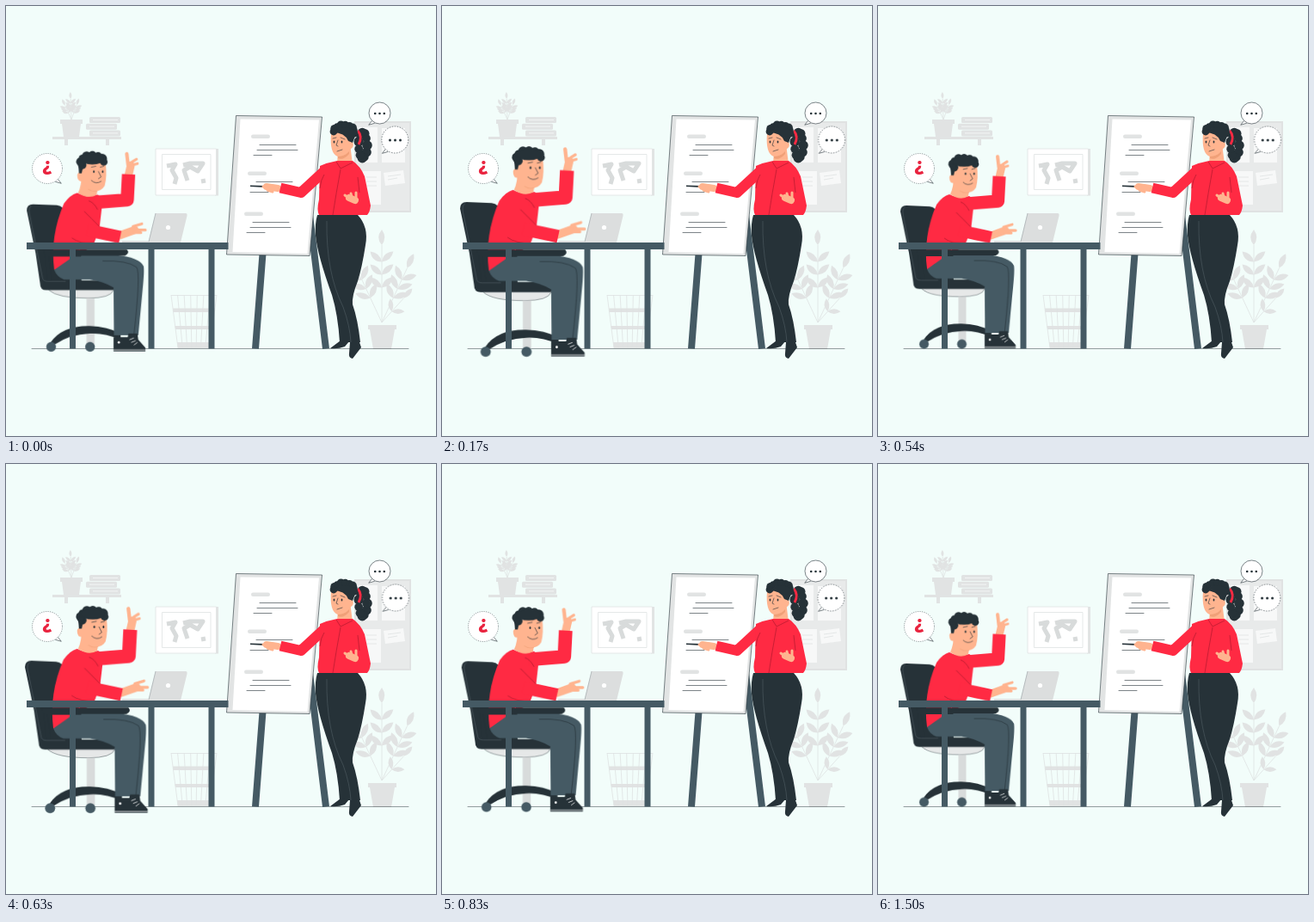
These frames come from a looping animation (500x500 px, 1.54 s). An HTML page:

```html
<!DOCTYPE html>
<html lang="en">
<head>
<meta charset="utf-8">
<title>Lesson at the flip chart</title>
<style>
  html, body { margin: 0; width: 100%; height: 100%; overflow: hidden; background: #f2fdfa; }
  svg { display: block; width: 100vw; height: 100vh; }
  .dark { fill: #263238; }
  .slate { fill: #455a64; }
  .red { fill: #ff2a43; }
  .skin { fill: #ffb48f; }
  .grey { fill: #e1e3e3; }
  .white { fill: #fff; }
  .limb { fill: none; stroke-linejoin: round; }
  .limb.dark { stroke: #263238; }
  .limb.slate { stroke: #455a64; }
  .limb.red { stroke: #ff2a43; }
  .limb.skin { stroke: #ffb48f; stroke-linecap: round; }
  .limb.grey { stroke: #d8dbdb; }
  .ink { fill: none; stroke: #263238; stroke-width: .6; stroke-linecap: round; }
  .fold { fill: none; stroke: #a3172b; stroke-width: .6; }
  .seam { fill: none; stroke: #58666c; stroke-width: .5; }
  .pale { fill: none; stroke: #dfe2e2; stroke-width: .8; }
  .edge { fill: #fff; stroke: #263238; stroke-width: .6; }
  #man { transform-origin: 88px 282px; animation: beat 1540ms -40ms linear infinite; }
  #talk { animation: sway 385ms ease-in-out infinite; }
  @keyframes beat {
    0%, 37.7% { transform: scale(1); }
    9.1%, 46.8% { transform: scale(1.1); animation-timing-function: cubic-bezier(.3, .25, .6, 1); }
    35.1%, 72.7%, 100% { transform: scale(1); }
  }
  @keyframes sway { 50% { transform: translateX(.8px); } }
</style>
</head>
<body>
<svg viewBox="0 0 500 500">
  <!-- shelf -->
  <g id="sprig"></g>
  <path class="grey" d="M54 152H134V155H54zM68 155h4v7h-4zM116 155h4v7h-4zM63 132H89V137H63zM65 137H87L85 152H67z"/>
  <g id="books"></g>

  <!-- map -->
  <path class="grey" d="M243 166H247V220.500H243z"/>
  <path class="pale white" style="fill:#fff" d="M174 166H244.500V220H174z"/>
  <path class="pale" d="M181.500 172.500H238V213.500H181.500z"/>
  <path class="limb grey" stroke-width="5" d="M187 186l10-2-4 7 5 9-2 7M206 185l8-2 15 0-6 9-9-5-7 4 4 12M227 204l5-1"/>

  <!-- pin board -->
  <path fill="#e0e2e2" d="M405 134H471V240H405z"/>
  <path fill="#e8eaea" d="M407 136H469V238H407z"/>
  <path fill="#f7f8f8" d="M410 141h22v41h-22zM437 142h27v40h-27zM415 192h21v39h-21zM439 194l23-3 2 15-23 3z"/>
  <path class="pale" d="M419 199h12m-12 5h12m-12 5h12m13-11l15-2m-15 6l11-2"/>

  <!-- potted plant and bin -->
  <g id="plant"></g>
  <path class="grey" d="M421 371H454V376H421zM423 376H452L448 399H427z"/>
  <path class="grey" d="M194 351.500H243L242.500 356H194.500zM196.500 372H240.500L240 376H197zM199 391H238L237 398H200z"/>
  <g id="bin"></g>
  <path class="ink" d="M30 398.500H468" opacity=".8"/>

  <!-- flip chart -->
  <path class="limb slate" stroke-width="8" d="M298.500 288L290 398.500M352 235L372 398.500"/>
  <path d="M267.500 127.500L367.500 129L353 290.500L256.500 289z" fill="#e2e4e4" stroke="#263238" stroke-width=".6"/>
  <path class="white" d="M272.500 131.500L364 132.500L350.500 288L263.500 286z"/>
  <g id="notes"></g>

  <!-- teacher -->
  <g id="tail" class="dark"></g>
  <path class="limb red" stroke-width="2.800" d="M409 145Q415 152 410 161"/>
  <path class="skin" d="M386 168L400 160L403 184L385 184z"/>
  <path d="M386 173Q393 176 399 169V172Q392 180 386 177z" fill="#f0a078"/>
  <path class="skin" d="M378 148Q388 141 396 150L403 158Q406 163 400 167Q394 175 386 175Q376 172 378 148z"/>
  <g id="crown" class="dark"></g>
  <path class="dark" d="M380 147Q393 136 408 146L403 159L398 157Q394 147 380 147z"/>
  <path class="ink" d="M380 154l4-1M389 153l5 2M386 156l-2 6 2 1M385 169l6-2"/>
  <g id="look" class="dark"></g>
  <path class="dark" d="M284 208.500L302 209V211L284 210z"/>
  <path class="limb skin" stroke-width="8" d="M303 210L316 212"/>
  <path class="limb skin" stroke-width="3" d="M299 210h6M304 214l6 2"/>
  <path class="dark" d="M362 243H409Q422 257 418 278Q414 304 409 320Q402 337 403 347Q409 364 412 391H388Q386 359 379 336Q362 289 360 267Q359 253 362 243z"/>
  <path class="seam" d="M373 250Q372 310 392 350Q400 372 401 391"/>
  <path class="dark" d="M389 389l10 1-5 6Q386 399 377 398zM400 391h11l2 6-10 13Q398 409 399 404z"/>
  <path class="limb red" stroke-width="12" d="M319 211.500L343 217L369 193"/>
  <path class="red" d="M385 180H403Q412 186 417 198L424 232Q423 240 420 243H364Q361 237 364 225L365 186Q374 182 385 180z"/>
  <path class="fold" d="M384 181l5 8 14-7M389 190Q384 217 380 243M365 212Q366 202 370 196M409 199l2 18"/>
  <path class="limb skin" stroke-width="8" d="M399 223L406 226"/>
  <path class="limb skin" stroke-width="3" d="M394 220l4 3M401 218l1 4M407 217l0 6"/>

  <!-- pupil on his chair -->
  <g id="man">
    <path class="dark" d="M26 239Q26 232 33 232L60 233Q68 234 70 243L88 318H120Q126 320 124 329H48Q41 329 41 321L36 287z"/>
    <path class="seam" d="M31 234Q28 236 29 242L44 316Q45 319 50 319H70"/>
    <path d="M51 329H124Q121 338 95 338Q61 338 51 329z" fill="#e6e8e8" stroke="#263238" stroke-width=".4"/>
    <path class="limb grey" stroke-width="9" d="M98 338V390"/>
    <path class="dark" d="M53 388Q66 369 97 369.500Q117 370 132 378V385Q114 377 97 378Q75 379 58 390z"/>
    <circle class="slate" cx="53.500" cy="393" r="5.500"/>
    <circle class="slate" cx="97.500" cy="393" r="5.500"/>

    <path class="limb skin" stroke-width="9" d="M131 267L148 261"/>
    <path class="limb skin" stroke-width="3" d="M146 257l10-3M149 261l11 0M147 264l8 0"/>
    <path class="limb skin" stroke-width="9" d="M141 199L143.500 188"/>
    <path class="limb skin" stroke-width="4" d="M140.500 188L139 175"/>
    <path class="limb skin" stroke-width="3" d="M145 184l5-3M147 187l4-1"/>
    <path class="red" d="M83 219Q94 225 106 221L112 225L108 260L102 276L80 295L57 306Q52 268 68 231Q75 221 83 219z"/>
    <path class="limb red" stroke-width="14" d="M94 261L131.500 269"/>
    <path class="limb red" stroke-width="15" d="M100 230L139.500 227L141 198"/>
    <path class="fold" d="M106 238Q102 230 96 228M108 257Q99 248 91 240M103 276Q86 277 77 270"/>
    <path class="slate" d="M57 306Q70 297 84 287L126 289Q154 292 158 302Q159 307 157 327L152 380H124.500L124 326Q112 319 97 317H68Q60 314 57 306z"/>
    <path class="ink" d="M112 296Q139 295 150 303Q155 309 147 380"/>
    <path class="dark" d="M124 382H140L141 378H151L152 385L160 394V398H124z"/>
    <path class="limb" stroke="#fff" stroke-width=".7" d="M124 396.500H160M142 385l5-2m-3 5l5-2m-2 5l4-3"/>
    <circle class="white" cx="130" cy="388" r="1.300"/>

    <path class="skin" d="M88 196L107 208L105 221Q96 227 84 219Q88 211 88 196z"/>
    <path d="M95 215Q101 219 106 217V212z" fill="#f0a078"/>
    <path class="skin" d="M88 191Q98 180 115 185Q117 200 114 211Q110 218 100 217Q92 214 89 206Q83 207 83 199Q84 195 88 196z"/>
    <g id="hair" class="dark"></g>
    <path class="dark" d="M84 184H91L88 197H85z"/>
    <path class="ink" d="M99 190l5-1M109 190l4-1M107 195l3 6-3 2M99 205Q104 210 110 206"/>
    <g id="gaze" class="dark"></g>
    <path class="dark" d="M44 283H84Q93 284 87 291H49Q45 290 44 283zM86 283H139Q143 287 137 290H84zM46 289h4l4 29h-5z"/>
  </g>

  <!-- laptop and desk -->
  <path fill="#dcdede" d="M174 241H209Q211 241 210.500 244L203 275H135V273H166z"/>
  <path class="limb" stroke="#b4babc" d="M174 241L166 274"/>
  <circle class="white" cx="188.500" cy="257.500" r="2.600"/>
  <path class="limb slate" stroke-width="7" d="M77.500 280V398.500M169 280V398.500M239 280V398.500"/>
  <path class="slate" d="M24 275H258.500V283H24z"/>

  <!-- speech bubbles -->
  <g id="ask"></g>
  <text x="47.800" y="192" fill="#e9233f" font-family="'Open Sans', sans-serif" font-size="21" font-weight="800" text-anchor="middle">¿</text>
  <g id="chat"></g>
  <g id="talk"></g>
</svg>
<script>
  const put = (id, html) => document.getElementById(id).innerHTML += html;
  const range = n => [...Array(n).keys()];
  const each = (n, draw) => range(n).map(draw).join('');
  const disc = (x, y, r) => `<circle cx="${x}" cy="${y}" r="${r}"/>`;
  const line = (cls, x0, y0, x1, y1) => `<path class="${cls}" d="M${x0} ${y0}L${x1} ${y1}"/>`;

  // Curly hair: an oval ringed with uneven discs from angle a to b, in turns
  function curls(id, x, y, rx, ry, r, n, a = 0, b = 1) {
    put(id, each(n, i => {
      const t = 2 * Math.PI * (a + (b - a) * i / (n - 1));
      return disc(x + rx * Math.cos(t), y + ry * Math.sin(t), r + .6 * Math.sin(i * 2.4));
    }));
  }
  curls('tail', 415, 162, 5, 15, 5.2, 12);
  curls('crown', 393, 146, 12, 8, 4.4, 9, .5, 1.04);
  curls('hair', 100, 184, 13, 7.500, 4.800, 8, .42, 1);
  put('hair', '<ellipse cx="100" cy="181" rx="13" ry="6"/>');

  const eyes = (id, x, y, gap) =>
    put(id, each(2, i => `<ellipse cx="${x + gap * i}" cy="${y}" rx=".9" ry="1.500"/>`));
  eyes('look', 381.5, 158, 9);
  eyes('gaze', 101.8, 195, 10);

  // A stem with leaf pairs along its upper part and one leaf at the tip
  const leaf = (x, y, turn, len) =>
    `<path class="grey" transform="translate(${x} ${y}) rotate(${turn})" d="M0 0Q${len * .5} ${-len * .42} ${len} 0Q${len * .5} ${len * .36} 0 0"/>`;
  function stem(id, x, y, turn, size, pairs, len) {
    const a = turn * Math.PI / 180, dx = size * Math.cos(a), dy = size * Math.sin(a);
    put(id, line('pale', x, y, x + dx, y + dy) + leaf(x + dx, y + dy, turn, len) + each(pairs, i => {
      const k = .45 + .5 * i / pairs;
      return [-48, 48].map(s => leaf(x + dx * k, y + dy * k, turn + s, len)).join('');
    }));
  }
  for (const i of [-1, 0, 1]) {
    stem('sprig', 76, 132, i * 22 - 92, 24 - 6 * i * i, 3, 8);
    stem('plant', 437, 368, i * 25 - 90, 90 - 20 * i * i, 3, 18);
  }
  stem('plant', 437, 368, -48, 38, 1, 15);

  put('books', each(3, i => {
    const x = 97 - 4 * (i % 2), y = 129 + 7.7 * i;
    return `<rect class="grey" x="${x}" y="${y}" width="36" height="7" rx="1.500"/>` +
      line('limb white" stroke="#f3f5f5', x + 4, y + 3.5, x + 33, y + 3.5);
  }));

  put('bin', line('pale', 192, 336.5, 245, 336.5) +
    each(8, i => line('pale', 192 + 53 * i / 7, 336, 200 + 37 * i / 7, 398)));

  // Heading and three lines of writing in each block on the sheet
  [149.5, 192.5, 239.5].forEach((y, i) => {
    const x = 285 - 4 * i;
    put('notes', `<rect class="grey" x="${x}" y="${y}" width="22" height="4.500" rx="2.200"/>` +
      line('ink', x + 10, y + 12, x + 52, y + 12) +
      (i == 1 ? '' : line('ink', x + 7, y + 18, x + 54, y + 18)) +
      line('ink', x + 3, y + 24, x + 24, y + 24));
  });

  const bubble = (id, x, y, r, side, dash) => put(id,
    `<path class="edge" d="M${x + side * r * .7} ${y + r * .7}l${side * 4} 5l${side * -7} -2"/>` +
    `<circle class="edge" cx="${x}" cy="${y}" r="${r}" stroke-dasharray="${dash}"/>`);
  const dots = (id, x, y, gap, r) =>
    put(id, `<g class="dark">${each(3, i => disc(x + gap * (i - 1), y, r))}</g>`);
  bubble('ask', 48, 189, 17.5, 1, '1 1.500');
  bubble('chat', 434.5, 124.5, 12.5, -1, 'none');
  dots('chat', 434.5, 125, 5.3, 1.3);
  bubble('talk', 452.3, 155.5, 15.5, -1, '1.500 1.500');
  dots('talk', 452.5, 156, 6, 1.5);
</script>
</body>
</html>
```
